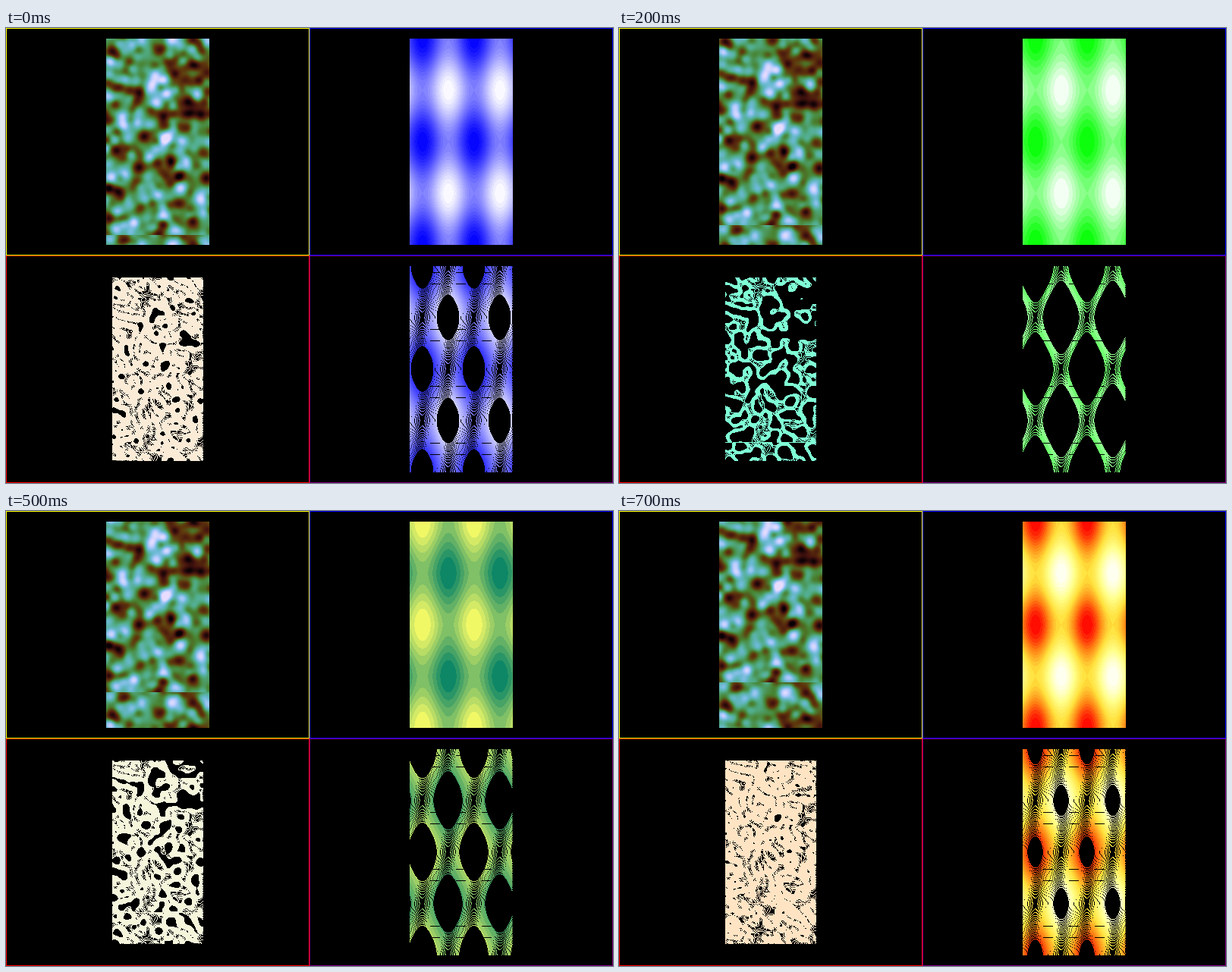
These frames come from a looping animation (800x600 px, 800 ms). An HTML page with a canvas:

```html
<!DOCTYPE html>
<html lang="en">
<head>
<meta charset="utf-8">
<title>Contour panels</title>
<style>
  html, body { margin: 0; width: 100%; height: 100%; overflow: hidden; background: #000; }
  canvas { display: block; width: 800px; height: 600px; }
</style>
</head>
<body>
<canvas id="stage" width="800" height="600"></canvas>
<script>
const ctx = document.getElementById('stage').getContext('2d');
const W = 136, H = 272, LW = 120, LH = 242;
const STEP_MS = 100, STEPS = 8, GAP = 0.1, TAU = Math.PI * 2;

const rgb = hex => [16, 8, 0].map(s => parseInt(hex, 16) >> s & 255);
const ramp = text => text.split(' ').map(rgb);

const EARTH = ramp('0a0005 48140e 5f3a0c 488230 50ac87 69b9d2 aac8fc e8dcff');
const themes = [
  { ramp: ramp('0000ff ffffff'), bands: 22, ink: rgb('faebd7') },
  { ramp: ramp('ff00ff 00ffff'), bands: 48, ink: rgb('00ffff') },
  { ramp: ramp('00ff00 ffffff'), bands: 10, ink: rgb('7fffd4') },
  { ramp: ramp('ff0000 ffffff'), bands: 22, ink: rgb('f0ffff') },
  { ramp: ramp('ffff66 008066'), bands: 9, ink: rgb('f5f5dc') },
  { ramp: ramp('ff0000 ff8214 ffe13c ffff8c fffffa'), bands: 22, ink: rgb('ffe4c4') }
];

// Landmarks of the terrain
const pits = [[44, 84], [108, 96], [125, 113], [13, 160], [50, 142], [132, 197], [16, 214], [43, 183]];
const peaks = [[61, 74], [66, 98], [23, 127], [98, 210], [125, 225], [7, 196], [86, 14]];

let seed = 7;
function rand() {
  seed = (Math.imul(seed, 1664525) + 1013904223) >>> 0;
  return seed / 4294967296;
}

const hills = [
  ...pits.map(([x, y]) => ({ x, y, h: -1.6, s: 6 })),
  ...peaks.map(([x, y]) => ({ x, y, h: 1.6, s: 6 }))
];
const marks = hills.slice();
const CELL = 9;
for (let y = 0; y <= H; y += CELL) {
  for (let x = 0; x <= W; x += CELL) {
    const p = { x: x + (rand() - 0.5) * CELL, y: y + (rand() - 0.5) * CELL, h: rand() * 2.2 - 1.1, s: 5 };
    if (marks.every(m => Math.hypot(m.x - p.x, m.y - p.y) > 10)) hills.push(p);
  }
}

function terrain(x, y) {
  let z = 0;
  for (const p of hills) {
    const d = ((p.x - x) ** 2 + (p.y - y) ** 2) / (p.s * p.s);
    if (d < 12) z += p.h * Math.exp(-d / 2);
  }
  return z;
}

const waves = (x, y) => -Math.sin(TAU * x / 68) - Math.cos(TAU * y / 136);

function grid(w, h, fn) {
  const sx = W / w, sy = H / h;
  return Float32Array.from({ length: w * h },
    (_, i) => fn((i % w + 0.5) * sx, (Math.floor(i / w) + 0.5) * sy));
}

function shade(stops, z) {
  const t = Math.min(0.9999, Math.max(0, (z + 2) / 4)) * (stops.length - 1);
  const i = Math.floor(t), f = t - i;
  return stops[i].map((c, k) => c + (stops[i + 1][k] - c) * f);
}

const band = (z, n) => (Math.min(n - 1, Math.floor((z + 2) / 4 * n)) + 0.5) / n * 4 - 2;

function scrolled(g, w, shift) {
  const s = Math.round(shift) * w;
  return g.map((_, i) => g[(i + s) % g.length]);
}

function paint(left, top, w, h, pick) {
  const img = ctx.createImageData(w, h);
  for (let i = 0; i < w * h; i++) {
    const c = pick(i);
    if (c) img.data.set(c, i * 4);
    img.data[i * 4 + 3] = 255;
  }
  ctx.putImageData(img, left, top);
}

// A contour runs where the clamped height changes its level
function contours(g, w, limit) {
  const level = g.map(z => Math.round(Math.max(-limit, Math.min(limit, z)) / GAP));
  return i => (i % w < w - 1 && level[i] !== level[i + 1]) ||
    (i + w < g.length && level[i] !== level[i + w]);
}

function frame(color, x, y) {
  ctx.strokeStyle = color;
  ctx.strokeRect(x + 0.5, y + 0.5, 399, 299);
}

const land = grid(W, H, terrain);
const lines = grid(LW, LH, terrain);
const sea = grid(W, H, waves);

function draw(n) {
  const { ramp, bands, ink } = themes[Math.floor((n * STEP_MS + 90) / 140)];
  const limit = Math.max(GAP, 0.4 * Math.abs(n - 3));
  const shift = 13 + 6.71 * n;

  const hi = scrolled(land, W, shift);
  paint(132, 14, W, H, i => shade(EARTH, hi[i] * 1.15));

  const onLand = contours(scrolled(lines, LW, shift * LH / H), LW, limit);
  paint(140, 329, LW, LH, i => onLand(i) && ink);

  const tint = i => shade(ramp, band(sea[i], bands));
  const onSea = contours(sea, W, limit);
  paint(532, 14, W, H, tint);
  paint(532, 314, W, H, i => onSea(i) && tint(i));

  // Pairs of thin breaks across the wave contours
  ctx.fillStyle = '#000';
  for (let y = 322; y < 580; y += 75) {
    for (let x = 559; x < 640; x += 34) {
      ctx.fillRect(x, y, 13, 1);
      ctx.fillRect(x, y + 15, 13, 1);
    }
  }
}

ctx.fillStyle = '#000';
ctx.fillRect(0, 0, 800, 600);
frame('#ff0', 0, 0);
frame('#00f', 400, 0);
frame('#f00', 0, 300);
frame('#800080', 400, 300);

let shown = 0;
draw(0);
const start = performance.now();
function tick() {
  const n = Math.floor((performance.now() - start) / STEP_MS) % STEPS;
  if (n !== shown) draw(shown = n);
  requestAnimationFrame(tick);
}
requestAnimationFrame(tick);
</script>
</body>
</html>
```
